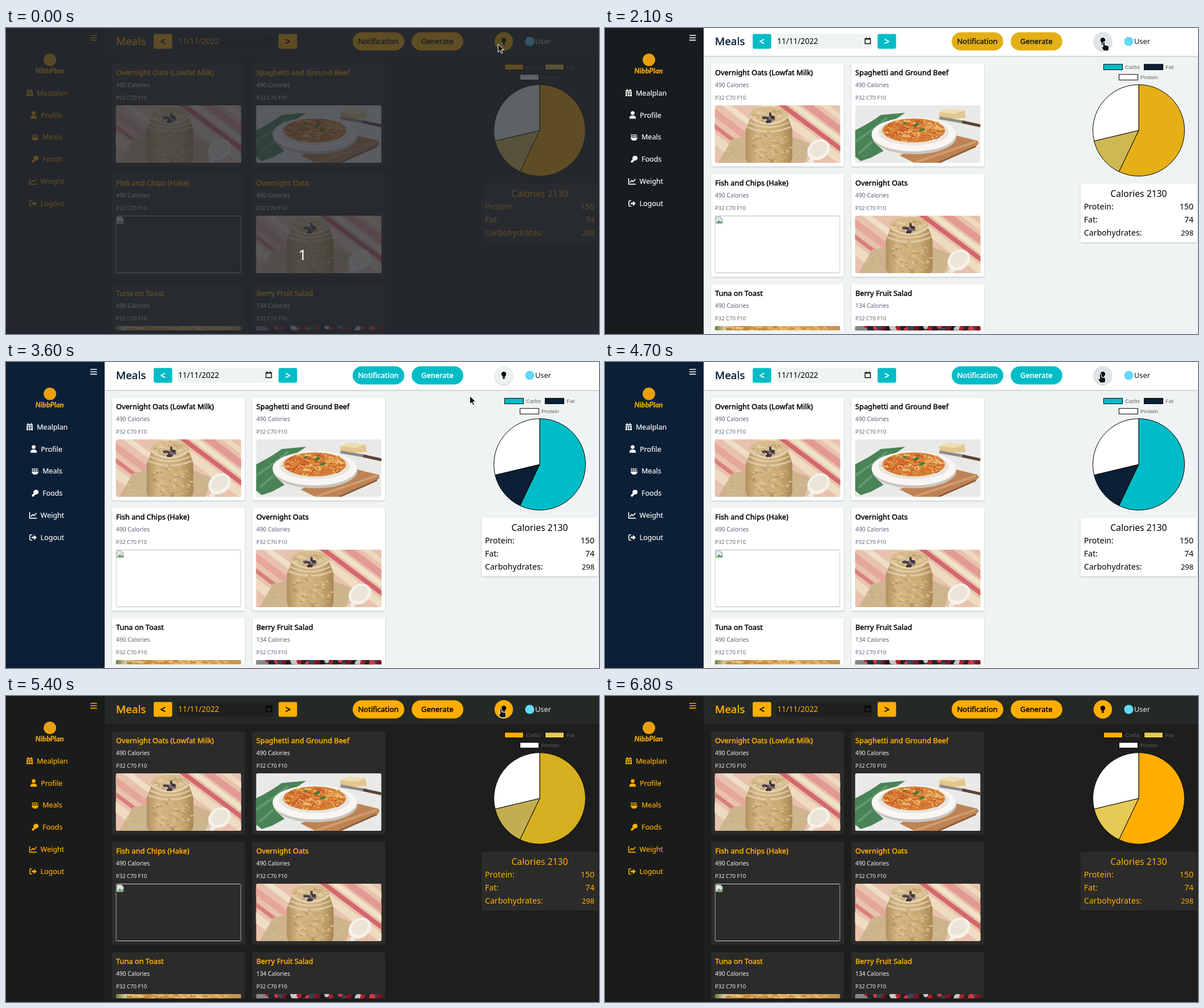
These frames come from a looping animation (1040x538 px, 7200 ms). An HTML page:

```html
<!DOCTYPE html>
<html lang="en">
<head>
<meta charset="utf-8">
<title>Meal planner</title>
<style>
html, body { margin: 0; width: 100%; height: 100%; overflow: hidden; background: #1e1e1c; }
svg { display: block; }
#stage {
  width: 100%; height: 100%;
  font-family: "Noto Sans", "Open Sans", sans-serif;
  --main: #1e1e1c; --head: #242826; --card: #2b2b2a; --field: #1e1f1e;
  --accent: #ffae00; --title: #ffae00; --heading: #ffae00; --date: #ffae00;
  --nav: #ffae00; --sub: #f2f2f2; --onAccent: #000; --user: #e9e9e9;
  --bulb: #ffae00; --frame: #cfcfcf; --legend: #5f5f5f;
  --keyCarbs: #ffae00; --keyFat: #e5ca55; --shadow: none;
}
#stage.light {
  --main: #eff3f4; --head: #fff; --card: #fff; --field: #eff3f4;
  --accent: #00bcc6; --title: #000; --heading: #0b1f36; --date: #000;
  --nav: #fff; --sub: #5b6675; --onAccent: #fff; --user: #111;
  --bulb: #eef1f2; --frame: #b8b8b8; --legend: #666;
  --keyCarbs: #00bcc6; --keyFat: #0b1f36;
  --shadow: drop-shadow(0 1px 1.2px rgba(0,0,0,.22));
}
#stage.light.hover { --bulb: #dee4e8; }
.raised { filter: var(--shadow); }
/* A thin outline gives the medium weight. */
.medium { stroke-width: .45; stroke-linejoin: round; }
.nav { fill: var(--nav); font-size: 12.5px; }
.nav text { stroke: var(--nav); stroke-width: .15; }
.line { fill: none; stroke: var(--nav); stroke-width: 1.6; stroke-linecap: round; stroke-linejoin: round; }
.title { fill: var(--title); stroke: var(--title); font-size: 12.8px; }
.heading { fill: var(--heading); stroke: var(--heading); font-size: 18.9px; }
.sub { fill: var(--sub); }
.mid { text-anchor: middle; }
.end { text-anchor: end; }
.pill { fill: var(--pill); }
.pillText { fill: var(--pillText); stroke: var(--pillText); font-size: 13px; }
.key { stroke: #000; stroke-width: 1; }
.legend { fill: var(--legend); font: 9.75px "Liberation Sans", Arial, sans-serif; }
.stat { fill: var(--title); font-size: 14.1px; }
#cursor path { fill: #111; stroke: #fff; stroke-width: 1; stroke-linejoin: round; }
</style>
</head>
<body>
<svg id="stage" viewBox="0 0 1040 538" preserveAspectRatio="none">
  <defs>
    <clipPath id="photo"><rect width="220" height="101" rx="3"/></clipPath>
    <clipPath id="list"><rect x="173" y="50" width="600" height="481.5"/></clipPath>
    <linearGradient id="jar">
      <stop offset="0" stop-color="#b0905f"/><stop offset=".25" stop-color="#d3b583"/>
      <stop offset=".7" stop-color="#cdad78"/><stop offset="1" stop-color="#a88652"/>
    </linearGradient>
    <linearGradient id="toast">
      <stop offset="0" stop-color="#6f7a3a"/><stop offset=".08" stop-color="#d7cda4"/>
      <stop offset=".2" stop-color="#c58a3a"/><stop offset=".6" stop-color="#dfa956"/>
      <stop offset="1" stop-color="#c3924d"/>
    </linearGradient>
  </defs>

  <rect width="1040" height="538" fill="var(--main)"/>
  <rect class="raised" x="173" width="867" height="49" fill="var(--head)"/>
  <rect width="173" height="538" fill="var(--side)"/>

  <path d="M148 13h11.500M148 17.200h11.500M148 21.400h11.500" class="line" style="stroke-linecap:butt"/>
  <circle cx="77" cy="56" r="11" fill="#e9a00f"/>
  <text x="76.500" y="80" class="mid" fill="#f0a510" style="font:italic 900 12.5px Lato,sans-serif">NibbPlan</text>
  <g id="nav"></g>

  <text x="193" y="30" class="heading medium">Meals</text>
  <g fill="var(--accent)">
    <rect x="259" y="10.500" width="32.500" height="26" rx="3"/>
    <rect x="478" y="10.500" width="32.500" height="26" rx="3"/>
  </g>
  <g class="mid" fill="var(--onAccent)" font-size="17" font-weight="700">
    <text x="275.200" y="29.500">&lt;</text><text x="494.500" y="29.500">&gt;</text>
  </g>
  <rect x="301" y="10.500" width="167.500" height="26" rx="3" fill="var(--field)"/>
  <text x="302" y="28.300" fill="var(--date)" font-size="13.500">11/11/2022</text>
  <path d="M456 19h9.500v8.500h-9.500zM458 16.500v2M463.500 16.500v2M456 19.500h9.500" fill="none" stroke="#000" stroke-width="1.300"/>
  <rect x="608" y="7.500" width="90.500" height="32" rx="16" class="pill"/>
  <rect x="711.500" y="7.500" width="90.500" height="32" rx="16" class="pill"/>
  <text x="653" y="28" class="mid pillText medium">Notification</text>
  <text x="756.500" y="28" class="mid pillText medium">Generate</text>
  <g class="raised"><circle cx="873" cy="23.500" r="16.200" fill="var(--bulb)"/></g>
  <path d="M871 26.500C871 24.500 868.800 23.800 868.800 21.300a4.200 4.200 0 0 1 8.400 0C877.200 23.800 875 24.500 875 26.500ZM871 27.300h4v1.200q0 1.300-2 1.300t-2-1.300Z"/>
  <circle cx="918.500" cy="23.500" r="8" fill="#61dafb"/>
  <text x="928" y="28.200" fill="var(--user)" font-size="12.800">User</text>

  <g id="cards" clip-path="url(#list)"></g>

  <g class="key">
    <rect x="874.500" y="63.800" width="33" height="9.700" fill="var(--keyCarbs)"/>
    <rect x="945.500" y="63.800" width="33" height="9.700" fill="var(--keyFat)"/>
    <rect x="901.500" y="81.700" width="33" height="9.700" fill="#fff"/>
  </g>
  <g class="legend">
    <text x="912" y="71.700">Carbs</text><text x="983" y="71.700">Fat</text><text x="939" y="89.500">Protein</text>
  </g>
  <g id="pie" stroke="#000" stroke-width="1" stroke-linejoin="bevel"></g>

  <rect class="raised" x="834" y="273.500" width="204.500" height="103.500" rx="3" fill="var(--card)"/>
  <g class="stat">
    <text x="936" y="297" class="mid" style="font-size:15.7px">Calories 2130</text>
    <text x="840" y="319.300">Protein:</text><text x="1032" y="319.300" class="end">150</text>
    <text x="840" y="342">Fat:</text><text x="1032" y="342" class="end">74</text>
    <text x="840" y="364.500">Carbohydrates:</text><text x="1032" y="365.300" class="end" style="font-size:12.8px">298</text>
  </g>

  <g id="countdown">
    <rect width="1040" height="538" fill="rgb(38,43,49)" opacity=".74"/>
    <text x="520" y="408" class="mid" fill="#fff" font-size="26">1</text>
  </g>
  <g id="cursor">
    <path id="arrow" d="M0 0V14.500L3.300 11.400 5.600 16.600 8 15.600 5.700 10.400H10.300Z"/>
    <path id="hand" d="M-1.600 1.600a1.600 1.600 0 0 1 3.200 0V6l5.400 1.100q1.700.5 1.700 2.100V12q0 3-2 4H-.5L-4.300 10q.6-2 2.700-.4Z"/>
  </g>
</svg>

<script>
const $ = id => document.getElementById(id);
const stage = $('stage');

function randomizer(seed) {
  return () => (seed = (seed * 16807) % 2147483647) / 2147483647;
}

// Scatter short strokes inside an ellipse.
function scatter(seed, count, [cx, cy, rx, ry], colors, length, width) {
  const rnd = randomizer(seed);
  let out = '';
  for (let i = 0; i < count; i++) {
    const a = rnd() * 6.283, r = Math.sqrt(rnd()), b = rnd() * 6.283;
    const x = cx + rx * r * Math.cos(a), y = cy + ry * r * Math.sin(a);
    out += `<path d="M${x.toFixed(1)} ${y.toFixed(1)}q${(length * Math.cos(b)).toFixed(1)} ${(length * Math.sin(b)).toFixed(1)} ${length} 1"
      fill="none" stroke="${colors[i % colors.length]}" stroke-width="${width}" stroke-linecap="round"/>`;
  }
  return out;
}

function oats() {
  const stripe = (x, w, c) => `<path d="M${x} -8l160 120" stroke="${c}" stroke-width="${w}"/>`;
  return `<rect width="220" height="101" fill="#e8c2ae"/>
    ${stripe(-90, 16, '#eedcc2')}${stripe(-60, 7, '#d97f7a')}${stripe(-28, 12, '#e6a79b')}${stripe(10, 10, '#eedfc6')}
    ${stripe(82, 14, '#efdcc0')}${stripe(108, 8, '#d4686c')}${stripe(128, 9, '#f0e2c6')}${stripe(152, 12, '#e39a92')}${stripe(182, 9, '#efd9bd')}
    <path d="M30 60L58 54H134L168 68 158 101H6Z" fill="#cdb48d"/>
    ${scatter(3, 40, [82, 84, 72, 18], ['#bb9e72', '#dcc7a2'], 5, 1)}
    <path d="M166 101L178 88" stroke="#efe9df" stroke-width="8"/>
    <ellipse cx="182" cy="78" rx="21" ry="17" fill="#f6f2ea" transform="rotate(-35 182 78)"/>
    <ellipse cx="182" cy="77" rx="16" ry="12" fill="#ebe4d8" transform="rotate(-35 182 77)"/>
    <path d="M63 20Q58 34 54 43V92Q55 101 62 104H128Q135 101 136 92V43Q133 33 128 20Z" fill="url(#jar)"/>
    <path d="M60 30Q95 47 130 30M57 38Q95 54 133 38" fill="none" stroke="#e9dcc0" stroke-width="3" opacity=".65"/>
    ${scatter(7, 100, [95, 73, 38, 27], ['#e0c698', '#b39160', '#d4b786', '#c3a06a'], 4, 1.7)}
    <ellipse cx="95" cy="18" rx="34" ry="16" fill="#d5ba8c"/>
    ${scatter(31, 50, [93, 17, 29, 13], ['#e6d3aa', '#bf9d6a', '#dcc394'], 4, 1.8)}
    <path d="M62 20Q95 45 128 20" fill="none" stroke="#eee3cc" stroke-width="2.500" opacity=".7"/>
    ${scatter(11, 22, [94, 22, 10, 8], ['#4b404a', '#6a5a66', '#3a323d'], 1, 3.600)}`;
}

function spaghetti() {
  return `<rect width="220" height="101" fill="#e9e9e7"/>
    <path d="M0 44Q28 30 45 17L88 13 66 28 40 46 35 66 50 80 28 92 10 98 0 90Z" fill="#4a8357"/>
    <path d="M0 64L32 42 56 22M6 85L30 64" fill="none" stroke="#649a6d" stroke-width="4"/>
    <path d="M78 88L165 50 214 62Q220 66 212 72L146 101H104Z" fill="#bd8354"/>
    <path d="M104 101L212 64" stroke="#cf9d6f" stroke-width="4"/>
    <path d="M212 72L146 101" stroke="#8b5a38" stroke-width="3"/>
    <path d="M148 12L162 6 192 9 194 22 164 24 148 20Z" fill="#e2c68d"/>
    <path d="M148 12L162 6 192 9 176 15Z" fill="#f0deb0"/>
    <path d="M148 22L194 30" stroke="#8e8c88" stroke-width="5"/>
    <path d="M188 29L220 36" stroke="#5b4436" stroke-width="5"/>
    <ellipse cx="104" cy="55" rx="74" ry="31" fill="#c9c5be"/>
    <ellipse cx="103" cy="51" rx="74" ry="30" fill="#f7f6f3"/>
    <ellipse cx="103" cy="47" rx="62" ry="23" fill="#e9e4dc"/>
    <ellipse cx="103" cy="44" rx="55" ry="21" fill="#d57e36"/>
    ${scatter(17, 120, [99, 43, 52, 18], ['#e9b064', '#c25022', '#e08c3a', '#efc47a', '#d0682e'], 8, 1.800)}
    <path d="M101 37q6-9 12-6q-1 8-12 6ZM111 45q7-7 12-3q-4 6-12 3ZM83 32q5-5 8-1q-3 4-8 1Z" fill="#4a7d32"/>`;
}

const toast = () => `<rect width="220" height="101" fill="url(#toast)"/>
  ${scatter(5, 50, [110, 5, 100, 5], ['#e6bd70', '#c08238', '#e8c583'], 6, 2)}`;

function berries() {
  const rnd = randomizer(23), tones = ['#b81d27', '#24222c', '#d43a3b', '#3b4358', '#7d1420', '#191920', '#c9c6c2'];
  let out = '<rect width="220" height="101" fill="#2a2429"/><rect width="28" height="101" fill="#85878b"/>';
  for (let i = 0; i < 26; i++)
    out += `<circle cx="${20 + i * 8}" cy="${(rnd() * 10).toFixed(1)}" r="${(4 + rnd() * 5).toFixed(1)}" fill="${tones[i % 7]}"/>`;
  return out;
}

const missing = () => `<rect x=".5" y=".5" width="219" height="100" fill="none" stroke="var(--frame)"/>
  <path d="M2 2h8l3.500 3.500V14H2Z" fill="#dfe7f2" stroke="#9b9b9b" stroke-width=".8"/>
  <path d="M3 13l4-5 3 3 3-2v4Z" fill="#56a64b"/><path d="M10 2v3.500h3.500" fill="#fff" stroke="#9b9b9b" stroke-width=".8"/>`;

const meals = [
  ['Overnight Oats (Lowfat Milk)', 490, oats], ['Spaghetti and Ground Beef', 490, spaghetti],
  ['Fish and Chips (Hake)', 490, missing], ['Overnight Oats', 490, oats],
  ['Tuna on Toast', 490, toast], ['Berry Fruit Salad', 134, berries]
];
$('cards').innerHTML = meals.map(([name, calories, picture], i) => `
  <g transform="translate(${186 + 246 * (i % 2)} ${62.5 + 194 * (i >> 1)})">
    <rect class="raised" width="233" height="181" rx="3" fill="var(--card)"/>
    <text x="7" y="20.500" class="title medium">${name}</text>
    <text x="7" y="41.300" class="sub" font-size="10.300">${calories} Calories</text>
    <text x="7" y="63" class="sub" font-size="9.500">P32 C70 F10</text>
    <g transform="translate(6.500 73.500)" clip-path="url(#photo)">${picture()}</g>
  </g>`).join('');

// Icons are drawn around their own centre.
const navItems = [
  ['Mealplan', 54, 41.5, '<path d="M-5.500-4.500h11v2h-11ZM-5.500-1.500h11v7.500h-11ZM-3.500-6.500h1.700v2.500h-1.700ZM1.800-6.500h1.700v2.500H1.800Z"/><path d="M-5 2H5M-1.900-1.500V6M1.900-1.500V6" stroke="var(--side)"/>'],
  ['Profile', 61, 48.5, '<circle cy="-3.300" r="3.300"/><path d="M-5.700 6.500q0-5.500 4.200-5.500h3q4.200 0 4.200 5.500Z"/>'],
  ['Meals', 64, 51, '<path d="M-6.300 1H6.300Q6 4 3.500 5v1h-7V5Q-6 4-6.300 1Z"/><path d="M-5.500-1H5.500M-5.500-3.700H5.500" stroke="var(--nav)" stroke-width="1.800" stroke-dasharray="2.600 .8"/>'],
  ['Foods', 64, 51, '<path d="M-3-3Q0-7.500 4-5.500 7.500-3.500 5.500 0 4 2.500 1 2.200L-1.500 4Q-1.500 6.500-4 6-7 5-5 2.500L-2.500.5Z"/>'],
  ['Weight', 60.5, 47.5, '<path class="line" d="M-6-5V5H6M-3.500 1.500L-.5-1.500 1.500.5 5.500-3.500"/>'],
  ['Logout', 60.5, 47.5, '<path class="line" d="M-2-4.700h-2q-1.700 0-1.700 1.700v6q0 1.700 1.700 1.700h2"/><path d="M-2.500-1.600H1.500V-4.500L6.500 0 1.500 4.500V1.600h-4Z"/>']
];
$('nav').innerHTML = navItems.map(([label, x, iconX, icon], i) => {
  const y = 114 + 38.9 * i;
  return `<g class="nav"><g transform="translate(${iconX} ${y})">${icon}</g><text x="${x}" y="${y + 4.6}">${label}</text></g>`;
}).join('');

const RADIUS = 80.4;
function slice(from, to) {
  const point = v => {
    const a = v / 522 * 2 * Math.PI;
    return `${936 + RADIUS * Math.sin(a)} ${180 - RADIUS * Math.cos(a)}`;
  };
  return `<path d="M936 180L${point(from)}A${RADIUS} ${RADIUS} 0 ${to - from > 261 ? 1 : 0} 1 ${point(to)}Z"/>`;
}
$('pie').innerHTML = slice(0, 298) + slice(298, 372) + slice(372, 522);
const [carbs, fat, protein] = $('pie').children;
protein.setAttribute('fill', '#fff');

const LOOP = 7200, STEP = 100, TO_LIGHT = 2073, TO_DARK = 5035;
const clamp = v => Math.min(1, Math.max(0, v));
const mix = (a, b, p) => `rgb(${a.map((v, i) => Math.round(v + (b[i] - v) * p))})`;
const outQuart = p => 1 - (1 - p) ** 4;
const fadeEase = p => 1 - (1 - p) ** 1.2;
const ORANGE = [255, 174, 0], TEAL = [0, 188, 198], GOLD = [229, 202, 85], NAVY = [11, 31, 54];
const COAL = [26, 28, 27], BLACK = [0, 0, 0], WHITE = [255, 255, 255];

// Share of the light theme for a fade of the given length.
function lightness(t, duration, ease) {
  return t < TO_DARK ? ease(clamp((t - TO_LIGHT) / duration)) : 1 - ease(clamp((t - TO_DARK) / duration));
}

const track = [
  [0, 863, 28], [100, 875, 23], [2000, 875, 23], [2100, 875, 24], [2300, 872, 28], [2500, 848, 41],
  [2700, 806, 66], [2800, 791, 79], [2900, 788, 78], [3300, 788, 78], [4100, 856, 29], [4200, 858, 27],
  [4300, 867, 22], [4400, 870, 21], [4500, 870, 21], [4700, 869, 20.5], [5100, 869, 20.5], [5300, 868, 22],
  [6100, 868, 22], [6200, 862, 19], [6400, 670, 14], [6700, 50, 2], [7200, 50, 2]
];
function cursorAt(t) {
  const i = Math.max(1, track.findIndex(k => k[0] >= t));
  const [t0, x0, y0] = track[i - 1], [t1, x1, y1] = track[i];
  const p = (t - t0) / (t1 - t0);
  return [x0 + (x1 - x0) * p, y0 + (y1 - y0) * p];
}

function draw(t) {
  const hand = (t >= 100 && t < 2400) || (t >= 4300 && t < 6300);
  const chart = lightness(t, 1000, outQuart), fade = lightness(t, 300, fadeEase);
  stage.classList.toggle('light', t >= 2100 && t < 5100);
  stage.classList.toggle('hover', hand);
  stage.style.setProperty('--side', mix(COAL, NAVY, fade));
  stage.style.setProperty('--pill', mix(ORANGE, TEAL, fade));
  stage.style.setProperty('--pillText', mix(BLACK, WHITE, fade));
  carbs.setAttribute('fill', mix(ORANGE, TEAL, chart));
  fat.setAttribute('fill', mix(GOLD, NAVY, chart));
  $('countdown').style.display = t < 100 ? '' : 'none';
  $('cursor').style.display = t < 6800 ? '' : 'none';
  $('cursor').setAttribute('transform', `translate(${cursorAt(t)})`);
  $('hand').style.display = hand ? '' : 'none';
  $('arrow').style.display = hand ? 'none' : '';
}

const start = performance.now();
function tick() {
  const t = (performance.now() - start) % LOOP;
  draw(Math.floor(t / STEP) * STEP);
  requestAnimationFrame(tick);
}
tick();
</script>
</body>
</html>
```
